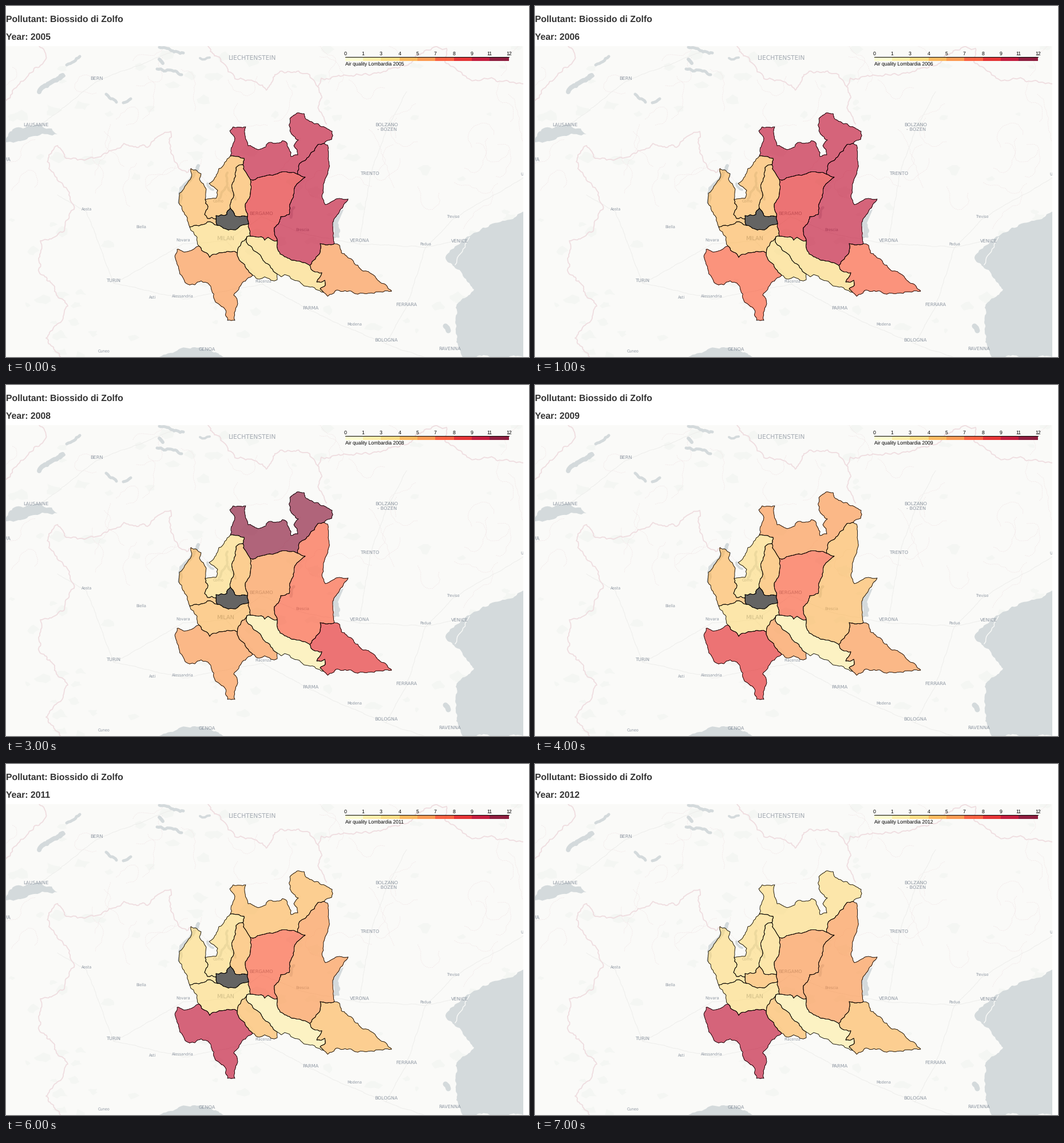
Write a matplotlib script that moves like this. It is 914x613 px and loops after 8000 ms.

```python
import math
import random
import matplotlib.pyplot as plt
from matplotlib.animation import FuncAnimation
from matplotlib.patches import Polygon, Rectangle

WIDTH, HEIGHT, DPI = 914, 613, 64
MAP_W, MAP_TOP = 904, 70
PT = 72 / DPI
LAND, WATER, PINK = "#fafaf8", "#d4dadc", "#efdde0"
YLORRD = ["#ffffcc", "#ffeda0", "#fed976", "#feb24c", "#fd8d3c",
          "#fc4e2a", "#e31a1c", "#bd0026", "#800026"]

plt.rcParams["text.hinting"] = "none"
plt.rcParams["font.family"] = "Liberation Sans"
rng = random.Random(12)

fig = plt.figure(figsize=(WIDTH / DPI, HEIGHT / DPI), dpi=DPI,
                 facecolor="white")
ax = fig.add_axes([0, 0, 1, 1])
ax.set_xlim(0, WIDTH)
ax.set_ylim(HEIGHT, 0)
ax.axis("off")


def split(p, q, rough):
    """Ragged points from p up to, but without, q."""
    dx, dy = q[0] - p[0], q[1] - p[1]
    size = math.hypot(dx, dy)
    if size < 5:
        return [p]
    k = rng.uniform(-rough, rough) * min(1, 16 / size)
    mid = ((p[0] + q[0]) / 2 - k * dy, (p[1] + q[1]) / 2 + k * dx)
    return split(p, mid, rough) + split(mid, q, rough)


def arc(*pts, rough=0.17):
    out = []
    for p, q in zip(pts, pts[1:]):
        out += split(p, q, rough)
    return out + [pts[-1]]


def line(pts, color, width, z=1, **kw):
    x, y = zip(*pts)
    ax.plot(x, y, color=color, lw=width * PT, zorder=z,
            solid_joinstyle="round", **kw)


def water(*pts):
    ax.add_patch(Polygon(arc(*pts), fc=WATER, ec="none", zorder=2))


def lake(width, *pts):
    line(arc(*pts), WATER, width, 2, solid_capstyle="round")


def border(*pts):
    line(arc(*pts, rough=.22), PINK, 1.8)


def road(*pts):
    line(arc(*pts, rough=.06), "#eeeeec", 1)


def label(x, y, s, size, color="#8f98a3", ha="center", z=3, **kw):
    return ax.text(x, y + 0.36 * size, s, fontsize=size * PT, color=color,
                   ha=ha, va="baseline", zorder=z, **kw)


def city(s, x, y, size=8.1, ha="center", color="#8f98a3"):
    label(x, y, s, size, color, ha, family="DejaVu Sans")


# ---- base map ----
ax.add_patch(Rectangle((0, MAP_TOP), MAP_W, HEIGHT - MAP_TOP, fc=LAND,
                       zorder=0))

for _ in range(100):
    cx, cy = rng.uniform(0, MAP_W), rng.uniform(MAP_TOP, HEIGHT)
    r = rng.uniform(4, 14)
    blob = [(cx + r * rng.uniform(.5, 1.5) * math.cos(k * .7),
             cy + r * rng.uniform(.3, 1) * math.sin(k * .7))
            for k in range(9)]
    ax.add_patch(Polygon(blob, fc="#f4f6f3", ec="none", zorder=0.5))

for _ in range(42):
    x, y = rng.uniform(0, MAP_W), rng.uniform(MAP_TOP, 330)
    turn = rng.uniform(0, 2 * math.pi)
    path = []
    for _ in range(14):
        path.append((x, y))
        turn += rng.uniform(-.8, .8)
        x, y = x + 7 * math.cos(turn), y + 7 * math.sin(turn)
    line(path, "#f2e6e7", .7, dashes=[3, 1.5])

road((188, 484), (310, 415), (384, 410), (446, 368), (518, 397), (618, 416),
     (733, 422), (790, 408))
road((384, 410), (449, 486), (532, 532), (664, 590), (730, 613))
road((618, 416), (636, 298), (665, 215), (700, 150))
road((664, 590), (700, 525), (733, 422), (781, 372), (904, 300))
road((52, 215), (158, 132), (290, 80))
road((90, 330), (141, 360), (188, 484), (310, 512), (449, 486))

border((0, 165), (45, 116), (70, 88), (58, 70))
border((90, 244), (102, 263), (133, 268), (166, 263), (206, 240), (247, 247),
       (263, 230), (288, 219), (285, 238), (299, 275), (316, 291), (324, 283))
border((90, 244), (75, 260), (75, 284), (111, 326), (119, 355), (101, 394),
       (60, 410), (58, 465), (108, 524), (100, 545), (70, 580), (95, 613))
border((353, 70), (380, 100), (400, 127), (438, 133), (455, 147), (479, 114),
       (522, 118), (545, 141), (552, 160), (548, 184), (560, 206))
border((545, 141), (551, 126), (600, 122), (700, 104), (716, 86), (770, 74),
       (767, 98), (809, 127), (904, 136))

water((0, 232), (14, 214), (45, 209), (80, 214), (90, 224), (55, 227),
      (25, 236), (0, 238))
lake(8, (58, 150), (76, 135), (99, 121))
lake(5, (106, 103), (129, 88))
lake(4, (95, 128), (102, 122))
lake(5, (175, 154), (183, 162), (193, 168))
lake(5, (205, 169), (218, 162))
lake(6, (268, 93), (274, 100))
lake(5, (264, 110), (288, 112), (307, 120))
lake(5, (268, 72), (310, 82))
lake(4, (339, 91), (356, 90))
lake(6, (336, 279), (324, 300), (304, 327), (303, 343))
lake(4, (352, 310), (362, 321))
lake(4, (387, 291), (386, 315), (401, 338))
lake(4, (386, 315), (372, 337))
lake(5, (503, 352), (498, 369))
water((598, 337), (570, 380), (573, 406), (583, 404), (584, 391), (580, 379))
water((904, 359), (886, 372), (850, 380), (818, 396), (788, 418), (768, 439),
      (783, 455), (804, 477), (818, 495), (786, 527), (786, 570), (798, 613),
      (904, 613))
lake(9, (768, 559), (773, 567))
water((268, 613), (299, 602), (330, 596), (361, 604), (380, 613))
line(arc((810, 404), (791, 436), (785, 452)), LAND, 1.4, 2.1)

city("BERN", 158, 126)
city("LAUSANNE", 52, 208)
city("BOLZANO", 665, 208)
city("- BOZEN", 666, 216)
city("TRENTO", 636, 293)
city("BERGAMO", 446, 363)
city("VERONA", 618, 410)
city("VENICE", 793, 411)
city("TURIN", 188, 479)
city("PARMA", 532, 527)
city("FERRARA", 700, 521)
city("BOLOGNA", 664, 584)
city("RAVENNA", 776, 598)
city("GENOA", 351, 600)
city("MILAN", 384, 405, 9.8)
city("LIECHTENSTEIN", 431, 90, 10.6, color="#a3aab2")
city("GENEVA", 8, 268, 8.8, "right")
city("UDINE", 899, 294, 6.6, "left")
city("Aosta", 141, 355, 6.5)
city("Biella", 236, 386, 6.5)
city("Novara", 310, 408, 6.9)
city("Asti", 256, 509, 6.5)
city("Alessandria", 309, 507, 6.5)
city("Cuneo", 171, 603, 6.5)
city("Como", 371, 341, 6.5)
city("Brescia", 518, 391, 6.5)
city("Piacenza", 450, 481, 6.5)
city("Treviso", 781, 368, 6.5)
city("Padua", 733, 416, 6.5)
city("Modena", 609, 556, 6.5)

# white page around the map
ax.add_patch(Rectangle((0, 0), WIDTH, MAP_TOP, fc="white", zorder=6))
ax.add_patch(Rectangle((MAP_W, 0), WIDTH - MAP_W, HEIGHT, fc="white",
                       zorder=6))

# ---- points where province borders meet ----
A, B, C, D = (392, 262), (556, 240), (510, 294), (427, 303)
E, F, G, H = (414, 277), (348, 338), (367, 372), (369, 383)
I, J, K, L = (321, 386), (392, 353), (422, 368), (424, 380)
M, N, O, P = (427, 402), (421, 403), (404, 431), (337, 419)
Q, R, S, T = (431, 470), (474, 468), (555, 500), (531, 453)
U, V = (474, 410), (574, 415)

# ---- outer edges and shared borders ----
so_out = arc(A, (397, 240), (400, 231), (391, 218), (397, 211), (419, 211),
             (418, 227), (423, 244), (436, 249), (454, 246), (457, 240),
             (483, 235), (490, 238), (498, 263), (510, 260), (503, 244),
             (511, 234), (496, 218), (496, 197), (513, 187), (521, 188),
             (523, 196), (546, 206), (570, 219), (569, 233), B)
so_bs = arc(B, (545, 242), (530, 262), (513, 275), C)
so_bg = arc(C, (478, 291), (444, 299), D)
so_lc = arc(D, E)
so_co = arc(E, (416, 266), A)
co_out = arc(A, (372, 284), (362, 305), (355, 310), (370, 322), (367, 336), F)
va_out = arc(I, (317, 370), (302, 344), (303, 327), (322, 303), (323, 284),
             (341, 293), (338, 302), (350, 320), F, rough=.13)
va_co = arc(F, (353, 350), (347, 364), (352, 371), G)
va_mb = arc(G, H)
va_mi = arc(H, (352, 377), (337, 384), I)
co_lc = arc(E, (402, 282), (399, 301), (395, 318), (397, 335), J)
co_mb = arc(J, (386, 364), (367, 366), G)
lc_mb = arc(J, (400, 366), K)
lc_bg = arc(D, (428, 320), (418, 350), K)
mb_bg = arc(K, L)
mb_mi = arc(L, (401, 391), H)
mi_bg = arc(L, M)
mi_cr = arc(N, M)
mi_lo = arc(N, (413, 411), O)
mi_pv = arc(O, (384, 430), (361, 434), (356, 439), (350, 431), P)
mi_out = arc(I, (334, 404), P)
pv_out = arc(P, (320, 428), (299, 425), (295, 437), (299, 451), (313, 483),
             (330, 487), (341, 480), (358, 490), (366, 517), (383, 530),
             (387, 549), (400, 549), (399, 536), (405, 520), (398, 505),
             (413, 483), Q)
lo_pv = arc(O, (411, 447), Q)
lo_out = arc(Q, (443, 477), (452, 473), (463, 479), (474, 478), R)
lo_cr = arc(N, (422, 415), (438, 430), (451, 446), R)
cr_out = arc(S, (528, 490), (502, 478), (487, 469), (481, 473), R)
cr_mn = arc(T, (537, 463), (552, 466), (543, 482), (557, 479), (558, 488),
            (549, 494), S)
bg_cr = arc(M, (446, 403), (452, 409), (458, 404), U)
cr_bs = arc(U, (476, 428), (495, 441), T)
bg_bs = arc(C, (523, 299), (507, 313), (501, 336), (495, 364), (480, 368),
            (469, 387), U)
bs_out = arc(B, (562, 243), (564, 284), (557, 305), (552, 332), (558, 347),
             (583, 336), (598, 337), (571, 378), V, rough=.1)
bs_mn = arc(V, (549, 415), (549, 430), T)
mn_out = arc(V, (583, 418), (586, 431), (605, 443), (624, 463), (641, 469),
             (656, 484), (674, 498), (643, 502), (606, 500), (579, 496),
             (562, 507), S)


def back(pts):
    return pts[::-1]


rings = {
    "SO": so_out + so_bs + so_bg + so_lc + so_co,
    "VA": va_out + va_co + va_mb + va_mi,
    "CO": co_out + va_co + back(co_mb) + back(co_lc) + so_co,
    "LC": co_lc + lc_mb + back(lc_bg) + so_lc,
    "BG": so_bg + lc_bg + mb_bg + mi_bg + bg_cr + back(bg_bs),
    "BS": bs_out + bs_mn + back(cr_bs) + back(bg_bs) + back(so_bs),
    "MB": lc_mb + mb_bg + mb_mi + back(va_mb) + back(co_mb),
    "MI": (mb_mi + va_mi + mi_out + back(mi_pv) + back(mi_lo) + mi_cr
           + back(mi_bg)),
    "PV": pv_out + back(lo_pv) + mi_pv,
    "LO": mi_lo + lo_pv + lo_out + back(lo_cr),
    "CR": mi_cr + bg_cr + cr_bs + cr_mn + cr_out + back(lo_cr),
    "MN": mn_out + back(cr_mn) + back(bs_mn),
}

# colour class per year, 2005 to 2012; "-" means no data
classes = {
    "SO": "77784332", "VA": "33333222", "CO": "33322222", "LC": "33433332",
    "BG": "66545554", "BS": "77653444", "MB": "-------3", "MI": "23332222",
    "PV": "45546677", "LO": "22144433", "CR": "22211111", "MN": "45664333",
}
fills = {}
for name, ring in rings.items():
    fills[name] = ax.add_patch(
        Polygon(ring, ec="none", alpha=.6, zorder=4, antialiased=False))
    ax.add_patch(Polygon(ring, fill=False, ec="black", lw=.85 * PT,
                         joinstyle="round", zorder=5))

# ---- titles and legend ----
label(0, 22, "Pollutant: Biossido di Zolfo", 15.7, "#333333", "left", 8,
      weight="bold")
year_text = label(0, 53.3, "", 15.7, "#333333", "left", 8, weight="bold")

stops = [593, 624, 655, 688, 719, 750, 783, 814, 845, 879]
for x0, x1, color in zip(stops, stops[1:], YLORRD):
    ax.add_patch(Rectangle((x0, 89), x1 - x0, 7, fc=color, ec="none",
                           alpha=.88, zorder=7))
for x, s in zip(stops, [0, 1, 3, 4, 5, 7, 8, 9, 11, 12]):
    label(x, 83, str(s), 8.7, "black", z=8)
line([(stops[0], 88.5), (stops[-1], 88.5)], "black", 1, 8)
caption = label(593, 100.7, "", 8.6, "black", "left", 8)


def update(i):
    for name, patch in fills.items():
        c = classes[name][i]
        patch.set_facecolor("black" if c == "-" else YLORRD[int(c)])
    year_text.set_text(f"Year: {2005 + i}")
    caption.set_text(f"Air quality Lombardia {2005 + i}")
    return [*fills.values(), year_text, caption]


anim = FuncAnimation(fig, update, frames=8, interval=1000, repeat=True,
                     repeat_delay=0)
plt.show()
```
